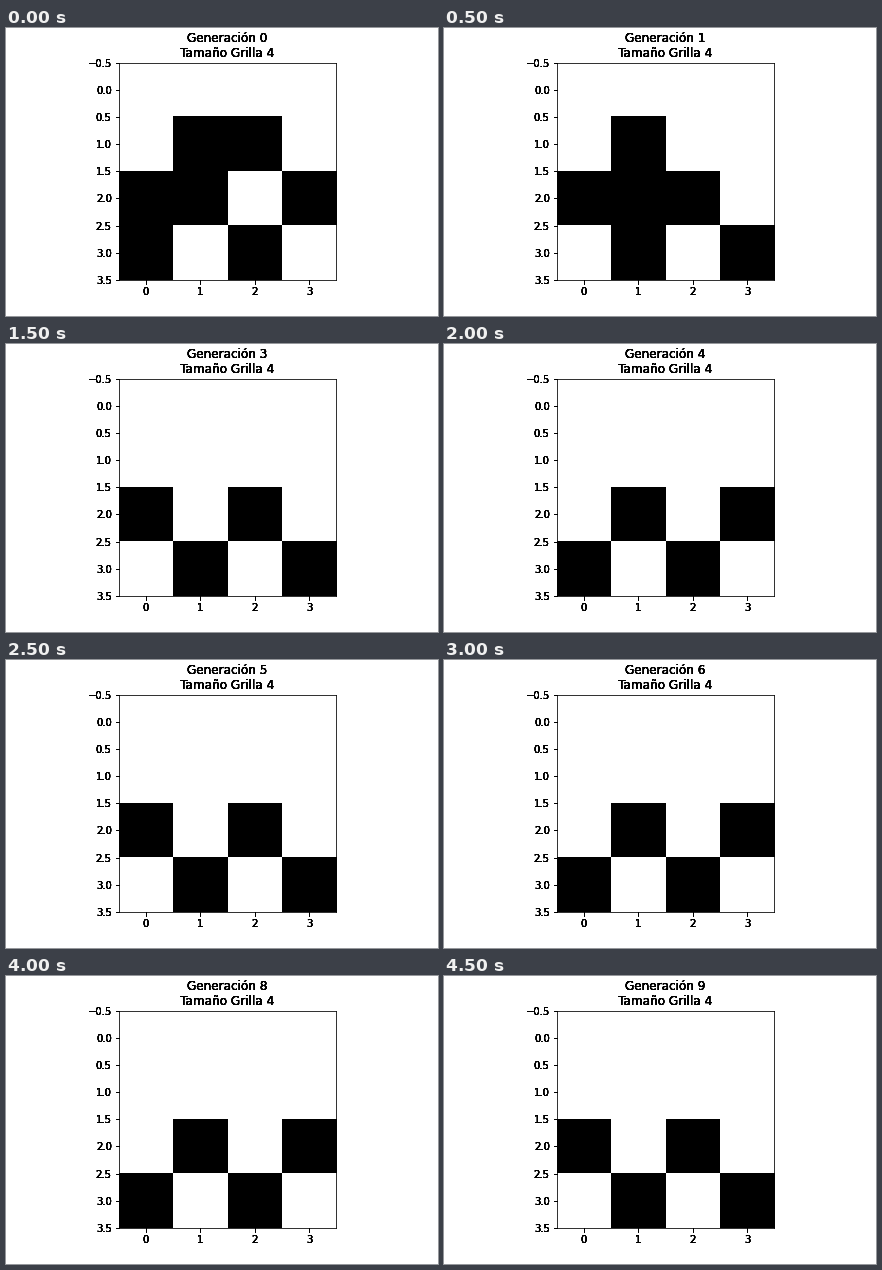
Write a matplotlib script that moves like this. It is 432 by 288 pixels and loops after 5000 ms.

```python
import numpy as np
import matplotlib.pyplot as plt
from matplotlib.animation import FuncAnimation

plt.rcParams["font.family"] = "DejaVu Sans"

SIZE = 4
GENERATIONS = 10
INTERVAL = 500
INK_LAYERS = 7  # stacked text layers give dark, hard-edged lettering

START = np.array([[0, 0, 0, 0],
                  [0, 1, 1, 0],
                  [1, 1, 0, 1],
                  [1, 0, 1, 0]])


def step(grid):
    """Majority vote of each cell and its four neighbours on a torus."""
    votes = grid + sum(np.roll(grid, shift, axis)
                       for axis in (0, 1) for shift in (-1, 1))
    return (votes >= 3).astype(int)


def evolve(grid, count):
    history = [grid]
    while len(history) < count:
        history.append(step(history[-1]))
    return history


def add_layer(fig, box):
    """Transparent axes that carry only ticks, labels and a title."""
    layer = fig.add_axes(box, facecolor="none")
    layer.set_aspect("equal")
    layer.set_xlim(-0.5, SIZE - 0.5)
    layer.set_ylim(SIZE - 0.5, -0.5)
    layer.set_xticks(range(SIZE))
    layer.set_yticks(np.arange(-0.5, SIZE, 0.5))
    layer.tick_params(labelsize=10)
    layer.spines[:].set_visible(False)
    return layer


history = evolve(START, GENERATIONS)

fig = plt.figure(figsize=(6, 4), dpi=72, facecolor="white")
box = [0.125, 0.125, 0.775, 0.755]
board = fig.add_axes(box)
image = board.imshow(START, cmap="binary", vmin=0, vmax=1,
                     interpolation="nearest")
board.set_xticks([])
board.set_yticks([])
layers = [add_layer(fig, box) for _ in range(INK_LAYERS)]
titles = [layer.set_title("", fontsize=12, pad=6) for layer in layers]


def update(generation):
    image.set_data(history[generation])
    for title in titles:
        title.set_text(f"Generación {generation}\nTamaño Grilla {SIZE}")
    return [image, *titles]


anim = FuncAnimation(fig, update, frames=GENERATIONS, interval=INTERVAL,
                     repeat=True, repeat_delay=0)
plt.show()
```
